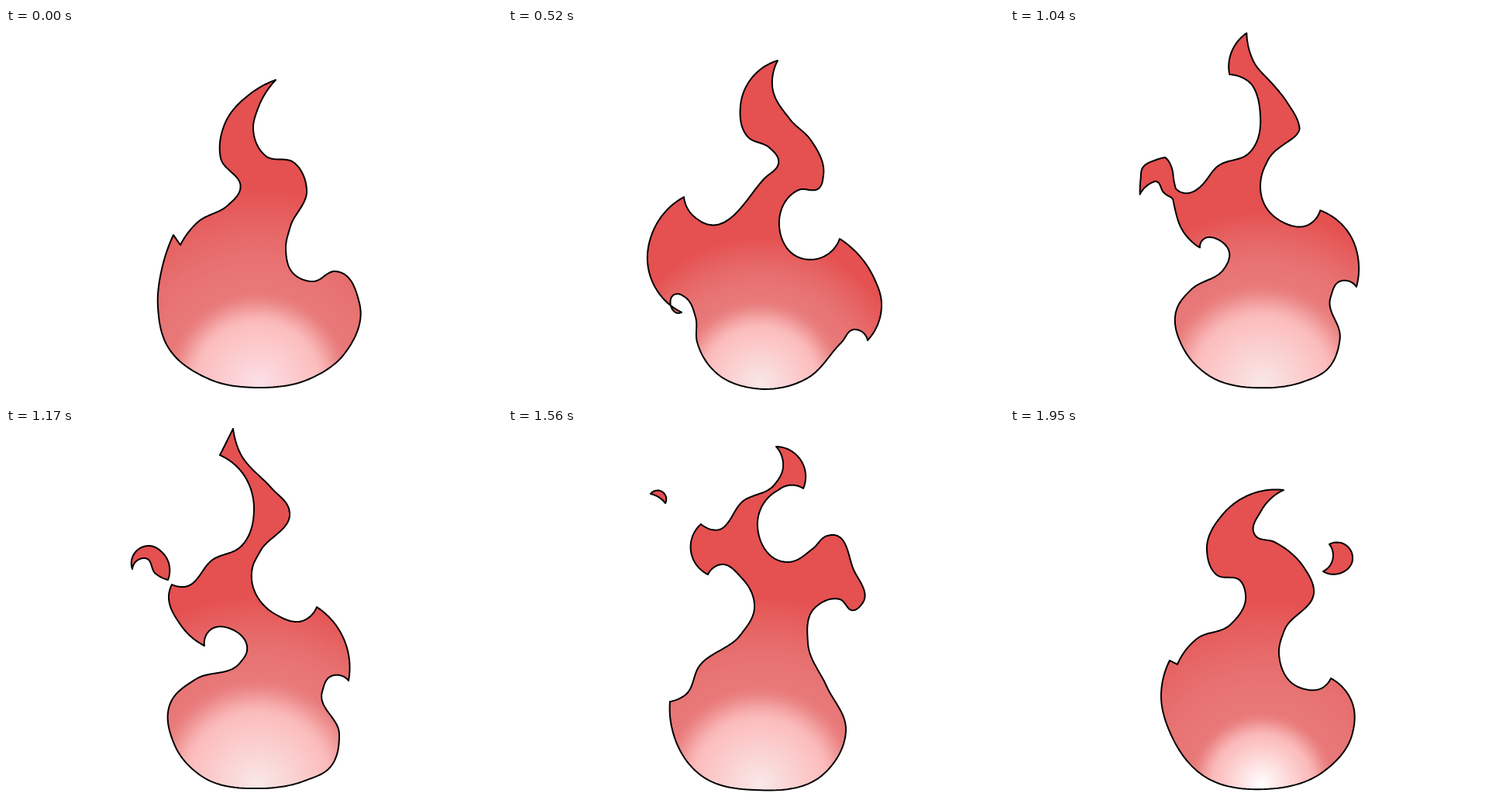
Recreate the animation shown at these times as an HTML page with a canvas. Size 640x480 px, loop 2.08 s.

```html
<!DOCTYPE html>
<html lang="en">
<head>
<meta charset="utf-8">
<title>Flame</title>
<style>
html, body { margin: 0; width: 100%; height: 100%; overflow: hidden; background: #fff; }
canvas { display: block; }
</style>
</head>
<body>
<canvas id="stage" width="640" height="480"></canvas>
<script>
const ctx = document.getElementById('stage').getContext('2d');
const TICK = 130, TICKS = 16;

// Key points of each outline, clockwise; the arcs between them are computed.
// A letter names a landmark: lower case is a sharp corner, upper case is smooth.
// "|" is where a loose part joins the body. glow: radii of the mid and red tones.
const poses = [
  { at: 0, glow: [122, 255], core: '#fce0e8',
    body: `t348,67 325,104 319,130 335,165 372,174 S388,208 367,256 V361,285 372,318 396,327
      R425,314 456,355 Q437,420 391,453 B325,464 262,453 X208,410 196,360 202,307 l216,267
      k225,280 248,250 286,229 M302,209 H277,168 283,122 315,85` },
  { at: 2, glow: [130, 225], core: '#f9e8e8',
    body: `t337,47 321,76 325,115 373,168 S388,200 378,229 V345,265 383,310 r409,289 447,322
      454,370 q412,433 p411,427 387,450 B338,464 282,453 252,426 234,397 Y230,389 x228,401
      194,367 186,320 l212,258 k223,270 245,233 300,204 M307,188 h279,168 276,130 289,86` },
  { at: 4, glow: [112, 190], core: '#f9e8e8',
    body: `t348,42 341,75 364,118 391,145 S407,190 402,206 375,209 V350,256 378,297 r428,272
      472,322 482,355 q464,403 448,389 P430,406 386,452 B318,465 271,447 244,405 W242,373
      228,347 Y219,343 x224,367 181,310 186,265 l227,218 235,238 K242,245 330,195 M349,170
      338,155 H309,140 300,100 325,54` },
  { at: 6, glow: [120, 182], core: '#f9e8e8',
    body: `t330,18 337,62 369,99 391,145 s391,181 350,183 V337,215 344,260 380,270 r399,244
      450,269 464,316 q457,350 440,340 P425,362 419,409 396,442 B318,463 248,435 213,380
      W228,310 y206,257 x177,280 179,252 169,230 186,206 l195,177 212,190 K222,229 247,222
      275,192 318,180 M329,130 309,97 h298,110 286,78 298,39` },
  { at: 9, glow: [140, 245], core: '#f9e8e8', split: true,
    body: `t293,1 301,30 343,78 S365,104 328,159 V318,180 347,240 387,247 r401,231 437,275
      q442,326 420,320 P408,340 430,395 418,438 386,455 B330,465 252,449 218,410 213,353
      245,324 302,303 W311,287 292,260 262,262 z256,281 226,255 211,210 | a214,202 K226,205
      268,169 303,153 M320,105 300,52 h276,35`,
    part: `j209,196 193,188 Y179,168 x163,182 184,152 L203,162 210,193` },
  { at: 12, glow: [130, 245], core: '#f9e8e8',
    body: `| g349,80 V322,128 362,173 393,156 R412,139 446,183 456,228 Q447,235 428,221 397,231
      P387,278 411,333 436,390 410,444 B318,467 250,449 211,385 c209,353 D228,345 247,307
      300,267 W318,232 302,194 271,177 z258,189 236,148 a249,124 K262,131 305,93 343,74`,
    part: `355,50 t346,24 369,32 s381,78 362,74`,
    spark: `j203,97 194,89 x184,85 200,83` },
  { at: 15, glow: [95, 240], core: '#fff',
    body: `g353,80 324,107 V316,138 341,147 380,181 R392,208 354,261 P347,290 374,335 405,334
      e414,323 441,353 441,397 405,443 B328,466 250,449 207,394 195,345 c206,300 d216,305
      241,272 284,254 W304,215 298,198 266,189 Z254,157 A274,112 318,83`,
    spark: `o412,150 442,170 424,188 o404,185 417,165` }
];

const lerp = (a, b, k) => a + (b - a) * k;
const mix = (p, q, k) => ({ x: lerp(p.x, q.x, k), y: lerp(p.y, q.y, k) });
const dist = (p, q) => Math.hypot(q.x - p.x, q.y - p.y) || 1e-6;
const dot = (p, q) => p.x * q.x + p.y * q.y;
const along = (p, d, len) => ({ x: p.x + d.x * len, y: p.y + d.y * len });

function unit(p, q) {
  const n = dist(p, q);
  return { x: (q.x - p.x) / n, y: (q.y - p.y) / n };
}

function parse(text) {
  return [...text.matchAll(/([a-z]?)(\d+),(\d+)/gi)].map(([, name, x, y]) => ({
    x: +x, y: +y, key: name.toLowerCase(), sharp: name !== '' && name === name.toLowerCase()
  }));
}

// Tangent at q of the circle through p, q and r
function tangent(p, q, r) {
  const a = dist(p, q), b = dist(q, r), u = unit(p, q), v = unit(q, r);
  return unit({ x: 0, y: 0 }, { x: u.x * b + v.x * a, y: u.y * b + v.y * a });
}

// A corner takes the mirrored tangent of the other end, which makes a plain arc
function mirror(d, chord) {
  const k = 2 * dot(d, chord);
  return { x: chord.x * k - d.x, y: chord.y * k - d.y };
}

function curve(text) {
  const nodes = parse(text), n = nodes.length, pts = [], marks = {}, STEPS = 14;
  const node = i => nodes[(i + n) % n];
  const dir = i => node(i).sharp ? null : tangent(node(i - 1), node(i), node(i + 1));
  nodes.forEach((a, i) => {
    const b = node(i + 1), len = dist(a, b), chord = unit(a, b);
    const da = dir(i), db = dir(i + 1);
    const from = da || (db ? mirror(db, chord) : chord);
    const to = db || (da ? mirror(da, chord) : chord);
    const reach = d => 2 / 3 * len / Math.max(1 + dot(d, chord), 1);
    const c = along(a, from, reach(from)), d = along(b, to, -reach(to));
    if (a.key) marks[a.key] = pts.length;
    for (let s = 0; s < STEPS; s++) {
      const k = s / STEPS, m = mix(c, d, k);
      pts.push(mix(mix(mix(a, c, k), m, k), mix(m, mix(d, b, k), k), k));
    }
  });
  return { pts, marks };
}

// Evenly spaced points along the outline from one landmark to the next
function stretch({ pts, marks }, from, to, count) {
  const n = pts.length, run = [], at = [0];
  const steps = (marks[to] - marks[from] + n) % n || n;
  for (let i = 0; i <= steps; i++) run.push(pts[(marks[from] + i) % n]);
  for (let i = 1; i <= steps; i++) at.push(at[i - 1] + dist(run[i - 1], run[i]));
  let j = 0;
  return Array.from({ length: count }, (_, i) => {
    const want = at[steps] * i / count;
    while (j < steps - 1 && at[j + 1] < want) j++;
    return mix(run[j], run[j + 1], (want - at[j]) / (at[j + 1] - at[j]));
  });
}

function morph(a, b, k) {
  const keys = Object.keys(a.marks).filter(key => key in b.marks)
    .sort((p, q) => a.marks[p] - a.marks[q]);
  return keys.flatMap((key, i) => {
    const next = keys[(i + 1) % keys.length];
    const p = stretch(a, key, next, 40), q = stretch(b, key, next, 40);
    return p.map((v, j) => mix(v, q[j], k));
  });
}

for (const p of poses) {
  p.whole = curve(p.body.replace('|', p.part || ''));
  p.bare = curve(p.body);
  p.loose = p.part && curve(p.part);
  p.ember = p.spark && curve(p.spark);
}

function still(p) {
  const shapes = p.split ? [p.bare, p.loose] : [p.whole];
  if (p.ember) shapes.push(p.ember);
  return shapes.map(s => s.pts);
}

function between(a, b, k) {
  if (a.split) return [morph(a.bare, b.whole, k), morph(a.loose, b.ember, k)];
  if (a.loose) {
    const tip = a.loose.pts.map(p => ({ x: p.x, y: p.y - 17 }));
    return [morph(a.bare, b.bare, k), tip];
  }
  return [morph(a.whole, b.whole, k)];
}

function sceneAt(tick) {
  if (tick === 13) tick = 12;
  const i = poses.findLastIndex(p => p.at <= tick);
  const a = poses[i], b = poses[i + 1];
  if (a.at === tick) return { shapes: still(a), glow: a.glow, core: a.core };
  const start = a.at === 12 ? 13 : a.at;
  const k = (tick - start) / (b.at - start);
  const glow = a.glow.map((r, j) => lerp(r, b.glow[j], k));
  return { shapes: between(a, b, k), glow, core: a.core };
}

const scenes = Array.from({ length: TICKS }, (_, i) => sceneAt(i));

const PINK = [252, 192, 192], MID = [232, 120, 120], RED = [229, 80, 80];
const smooth = k => k * k * (3 - 2 * k);
const slowStart = k => k ** 1.5;

function glowFill([mid, red], core) {
  const fill = ctx.createRadialGradient(325, 460, 0, 325, 460, red);
  const pink = mid * 0.6;
  const ramp = (r0, r1, c0, c1, ease) => {
    for (let i = 0; i <= 8; i++) {
      const k = i / 8, tone = c0.map((v, j) => Math.round(lerp(v, c1[j], ease(k))));
      fill.addColorStop(lerp(r0, r1, k) / red, `rgb(${tone})`);
    }
  };
  fill.addColorStop(0, core);
  ramp(pink, mid, PINK, MID, smooth);
  ramp(mid, red, MID, RED, slowStart);
  return fill;
}

function paint({ shapes, glow, core }) {
  ctx.fillStyle = '#fff';
  ctx.fillRect(0, 0, 640, 480);
  ctx.fillStyle = glowFill(glow, core);
  ctx.strokeStyle = '#000';
  ctx.lineWidth = 2;
  ctx.lineJoin = 'round';
  for (const pts of shapes) {
    ctx.beginPath();
    for (const p of pts) ctx.lineTo(p.x, p.y);
    ctx.closePath();
    ctx.fill();
    ctx.stroke();
  }
}

const begin = performance.now();
function frame() {
  const t = performance.now() - begin;
  paint(scenes[Math.floor(t / TICK) % TICKS]);
  requestAnimationFrame(frame);
}
frame();
</script>
</body>
</html>
```
